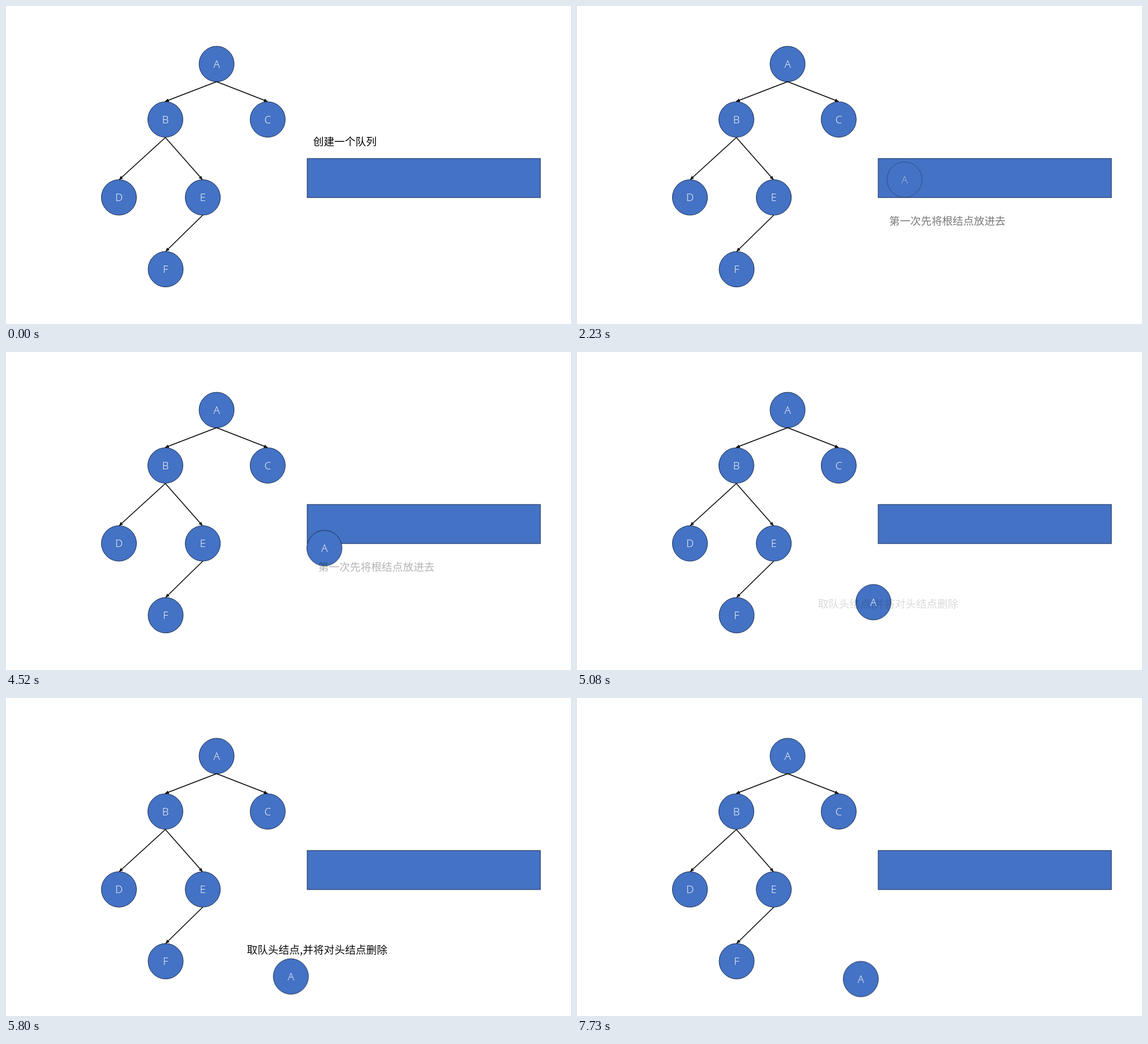
An HTML page that plays this animation: 998 px wide and 561 px high, repeating every 8 s.

```html
<!DOCTYPE html>
<html lang="zh-CN">
<head>
<meta charset="utf-8">
<title>队列与层序遍历</title>
<style>
  html, body { margin: 0; width: 100%; height: 100%; overflow: hidden; background: #fff; }
  svg { display: block; width: 100%; height: 100%; }
  .shape { fill: #4472c4; stroke: #172c51; stroke-width: 1; }
  .edge { stroke: #000; stroke-width: 1.5; marker-end: url(#head); }
  .letter { fill: #fff; font: 300 18.7px "Open Sans", "Noto Sans", sans-serif; text-anchor: middle; }
  .note { fill: #000; font: 400 18.7px "Noto Sans CJK SC", "Noto Sans CJK", sans-serif; }
</style>
</head>
<body>
<svg viewBox="0 0 998 561">
  <defs>
    <marker id="head" markerUnits="userSpaceOnUse" markerWidth="7" markerHeight="7"
            refX="6.5" refY="3.5" orient="auto">
      <path d="M0 .5 L6.5 3.5 L0 6.5 Z"/>
    </marker>
  </defs>
</svg>
<script>
const LOOP = 8000;
const svg = document.querySelector('svg');

function add(parent, tag, attrs, text) {
  const el = document.createElementNS('http://www.w3.org/2000/svg', tag);
  for (const key in attrs) el.setAttribute(key, attrs[key]);
  if (text) el.textContent = text;
  parent.append(el);
  return el;
}

function node(name, x, y) {
  const g = add(svg, 'g', {});
  add(g, 'ellipse', { class: 'shape', cx: x, cy: y, rx: 31, ry: 31.3 });
  add(g, 'text', { class: 'letter', x, y: y + 6.5 }, name);
  return g;
}

const note = (text, x, y) => add(svg, 'text', { class: 'note', x, y }, text);

// steps: [time in ms, value, easing towards the next step]
function play(el, prop, steps) {
  const frames = steps.map(([time, value, easing = 'linear']) =>
    ({ offset: time / LOOP, [prop]: value, easing }));
  el.animate(frames, { duration: LOOP, iterations: Infinity });
}

const nodes = [
  ['A', 372, 102.3], ['B', 281.5, 200.2], ['C', 462.3, 200.2],
  ['D', 199.5, 337.7], ['E', 347.6, 337.7], ['F', 282, 464.4]
];
const edges = [
  [372, 133.5, 281, 168.5], [372, 133.5, 462, 168.5],
  [281.5, 232, 200, 306.3], [281.5, 232, 347, 306.3],
  [347.5, 369, 282, 433]
];

for (const n of nodes) node(...n);
for (const [x1, y1, x2, y2] of edges) add(svg, 'line', { class: 'edge', x1, y1, x2, y2 });
add(svg, 'rect', { class: 'shape', x: 532, y: 269, width: 412, height: 69 });

const head = node('A', 578.5, 306.3);
const create = note('创建一个队列', 542.5, 246);
const push = note('第一次先将根结点放进去', 551.5, 386);
const pop = note('取队头结点,并将对头结点删除', 425.5, 451);

const fadeIn = 'cubic-bezier(.333, .667, .667, 1)';
const glide = 'cubic-bezier(.25, .06, .32, 1)';

play(create, 'opacity', [[0, 1], [1050, 1], [1530, 0], [LOOP, 0]]);
play(push, 'opacity', [[0, 0], [1920, 0, fadeIn], [2920, 1], [4170, 1], [4670, 0], [LOOP, 0]]);
play(pop, 'opacity', [[0, 0], [5005, 0, fadeIn], [6005, 1], [7250, 1], [7730, 0], [LOOP, 0]]);
play(head, 'opacity', [[0, 0], [1920, 0, fadeIn], [2920, 1], [LOOP, 1]]);

const rest = 'translate(0px, 0px)';
const out = 'translate(-77.2px, 189.5px)';
play(head, 'transform', [[0, rest], [4160, rest, glide], [6160, out], [LOOP, out]]);
</script>
</body>
</html>
```
